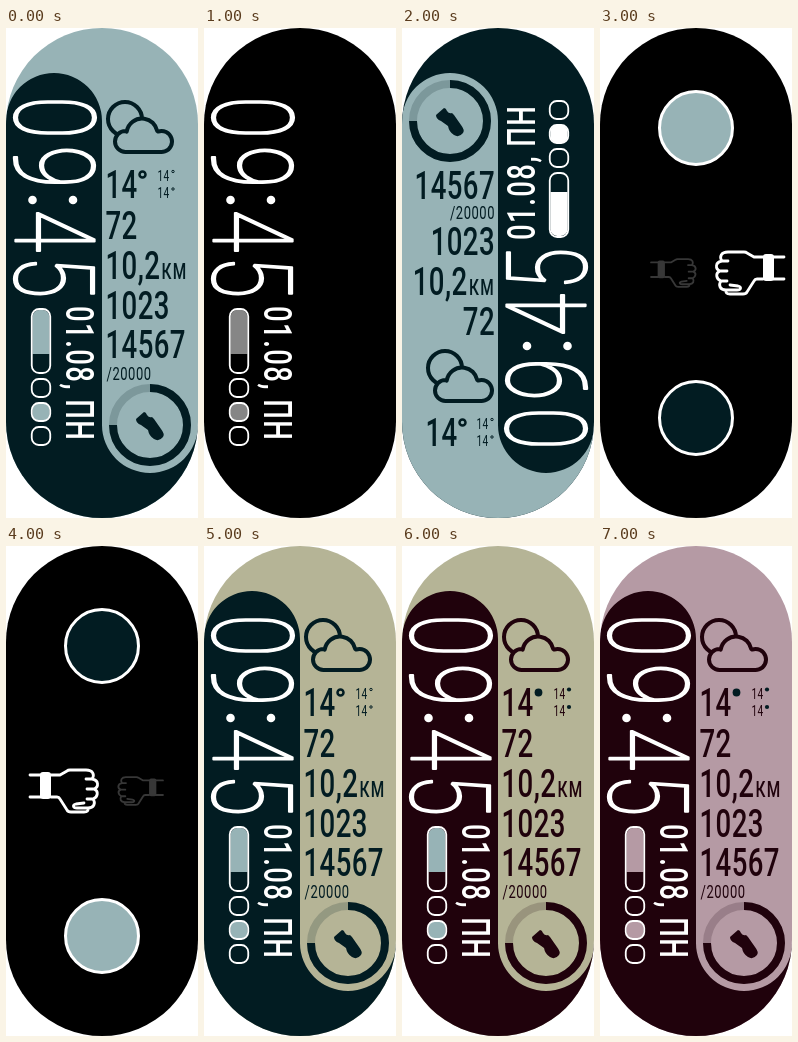
An HTML page with a canvas for the animation above (8000 ms loop, 192x490 px).

```html
<!DOCTYPE html>
<html lang="ru">
<head>
<meta charset="utf-8">
<title>Watch face</title>
<style>
html, body { margin: 0; width: 100%; height: 100%; overflow: hidden; background: #fff; }
canvas { display: block; width: 192px; height: 490px; }
</style>
</head>
<body>
<canvas id="stage"></canvas>
<script>
const W = 192, H = 490, STEP = 1000, TAU = Math.PI * 2;
const TEAL = '#97b3b6', INK = '#021c22', SAND = '#b5b496', ROSE = '#b59aa4', WINE = '#20020c';
const NARROW = 0.7; // condensed look shared by all type

const canvas = document.getElementById('stage');
const ctx = canvas.getContext('2d');
const dpr = window.devicePixelRatio || 1;
canvas.width = W * dpr;
canvas.height = H * dpr;

function group(draw, x = 0, y = 0, angle = 0, sx = 1, sy = sx) {
  ctx.save();
  ctx.translate(x, y);
  ctx.rotate(angle);
  ctx.scale(sx, sy);
  draw();
  ctx.restore();
}

function text(str, x, y, size, { color, align = 'left', weight = 500, spacing = 0.6, bold = 0 }) {
  group(() => {
    ctx.font = `${weight} ${size}px Roboto, sans-serif`;
    ctx.letterSpacing = spacing + 'px';
    ctx.textAlign = align;
    ctx.lineJoin = 'round';
    ctx.fillStyle = ctx.strokeStyle = color;
    ctx.fillText(str, 0, 0);
    if (bold) {
      ctx.lineWidth = bold;
      ctx.strokeText(str, 0, 0);
    }
  }, x, y, 0, NARROW, 1);
}

function paint(fill, stroke, width) {
  if (fill) { ctx.fillStyle = fill; ctx.fill(); }
  if (stroke) { ctx.strokeStyle = stroke; ctx.lineWidth = width; ctx.stroke(); }
}

function disc(x, y, r, fill, stroke, width) {
  ctx.beginPath();
  ctx.arc(x, y, r, 0, TAU);
  paint(fill, stroke, width);
}

function pill(x, y, w, h, r, fill, stroke, width) {
  ctx.beginPath();
  ctx.roundRect(x, y, w, h, r);
  paint(fill, stroke, width);
}

// Two interlocking halves: one owns top and right, the other left and bottom
function halves(upper, lower) {
  ctx.fillStyle = upper;
  ctx.fillRect(0, 0, W, H);
  ctx.beginPath();
  ctx.moveTo(0, 93);
  ctx.arc(48, 93, 48, Math.PI, TAU);
  ctx.lineTo(96, 397);
  ctx.arc(144, 397, 48, Math.PI, 0, true);
  ctx.lineTo(W, H);
  ctx.lineTo(0, H);
  ctx.closePath();
  paint(lower);
}

function clock(fill) {
  const white = '#fff';
  group(() => {
    const big = { color: white, align: 'center', weight: 100, spacing: 0, bold: 2.3 };
    [['0', 89.5], ['9', 138.7], ['4', 203], ['5', 249]].forEach(([c, x]) => text(c, x, -0.5, 111, big));
    disc(172, -18.5, 4.3, white);
    disc(172, -59, 4.3, white);
    text('01.08, ПН', 278, -51.5, 39.4, { color: white, spacing: 2 });
  }, 8, 0, Math.PI / 2);

  ctx.save();
  ctx.beginPath();
  ctx.rect(20, 280, 30, 46);
  ctx.clip();
  pill(26.5, 282, 17, 62, 7, fill);
  ctx.restore();
  pill(25.75, 281, 18.5, 64, 7.5, null, white, 1.8);
  pill(26.5, 375.5, 17, 17, 6, fill);
  [360, 384, 408].forEach(y => pill(25.75, y - 9, 18.5, 18, 7, null, white, 1.8));
}

function weather(x, y, ink, bg) {
  group(() => {
    ctx.lineJoin = 'round';
    disc(19, 19, 17, null, ink, 4);
    ctx.beginPath();
    ctx.arc(19.5, 41.5, 10.5, Math.PI / 2, 1.5 * Math.PI + 0.1);
    ctx.arc(36, 34, 15.5, Math.PI + 0.15, -0.2);
    ctx.arc(55.5, 41.5, 10.5, -1.9, Math.PI / 2);
    ctx.closePath();
    paint(bg, ink, 4);
  }, x, y);
}

function steps(x, y, ink) {
  const ring = (from, to) => {
    ctx.beginPath();
    ctx.arc(0, 0, 37, from, to);
    paint(null, ink, 8);
  };
  group(() => {
    ctx.globalAlpha = 0.18;
    ring(0, TAU);
    ctx.globalAlpha = 1;
    ring(-Math.PI / 2, Math.PI);
    ctx.fillStyle = ink;
    ctx.fill(new Path2D('M-14 -6 L-6 -13 Q-4 -13 -3 -10 Q-1 -7 2 -8 L4 -6 L11 4 Q15 9 13 12 Q9 17 4 14 Q-1 11 -2 5 L-9 0 Q-14 -2 -14 -6Z'));
  }, x, y);
}

function degree(x, y, r, color, solid) {
  if (solid) disc(x, y, r + 0.9, color);
  else disc(x, y, r, null, color, r > 2 ? 2.5 : 1);
}

function temperature(x, y, gap, ink, mark, solid) {
  const small = { color: ink, weight: 400 };
  text('14', x, y, 39.4, { color: ink });
  degree(x + 37, y - 23.5, 3, mark, solid);
  [17.5, 0].forEach(up => {
    text('14', x + gap, y - up, 14.5, small);
    degree(x + gap + 15.5, y - up - 9, 1.2, mark, solid);
  });
}

function stats(x, ys, align, ink) {
  const style = { color: ink, align };
  const right = align === 'right';
  const [pulse, km, kcal, count, goal] = ys;
  text('72', x, pulse, 39.4, style);
  text('10,2', right ? x - 27.5 : x, km, 39.4, style);
  text('КМ', right ? x : x + 56, km, 22, { color: ink, align, spacing: 1.8 });
  text('1023', x, kcal, 39.4, style);
  text('14567', x, count, 39.4, style);
  text('/20000', x + (right ? 0 : 1), goal, 18.5, { color: ink, align, weight: 400, spacing: 0.8 });
}

function leftFace({ light, dark, fill = light, mark = dark, solid = false }) {
  halves(light, dark);
  clock(fill);
  weather(100, 72, dark, light);
  temperature(99.5, 170, 52, dark, mark, solid);
  stats(99.5, [211, 251, 291, 330, 352], 'left', dark);
  steps(144, 397, dark);
}

function rightFace() {
  halves(INK, TEAL);
  group(() => clock('#fff'), W, H, Math.PI);
  steps(48, 93, INK);
  stats(93, [307, 267, 227, 171, 191], 'right', INK);
  weather(24, 321, INK, TEAL);
  temperature(23.5, 418, 51, INK, INK, false);
}

function dimFace() {
  ctx.fillStyle = '#000';
  ctx.fillRect(0, 0, W, H);
  clock('#868686');
}

const FIST = new Path2D(
  'M-34 -16H-23M-34 6H-23M-13 -16H-4L3 -20Q4 -21 6 -21H22C29 -21 31 -16 28 -12' +
  'C35 -11 35 -4 30 -2C35 0 34 6 29 8C32 12 30 17 24 17H13C9 17 8 14 12 13L20 12' +
  'M28 -12H22M30 -2H23M29 8H23M-13 6H-7Q-5 6 -4 8L3 19Q4 21 7 21H20Q25 21 24 17');

function fist(x, scale, flip, color) {
  group(() => {
    ctx.lineWidth = 2.8;
    ctx.lineJoin = ctx.lineCap = 'round';
    ctx.strokeStyle = color;
    ctx.stroke(FIST);
    pill(-24, -19, 11, 27, 3, color);
  }, x, 245, 0, flip * scale, scale);
}

function picker(top, bottom, leftHand) {
  ctx.fillStyle = '#000';
  ctx.fillRect(0, 0, W, H);
  disc(96, 100, 36.5, top, '#fff', 3);
  disc(96, 390, 36.5, bottom, '#fff', 3);
  const grey = '#373737';
  if (leftHand) {
    fist(58, 1, 1, '#fff');
    fist(134.5, 0.66, -1, grey);
  } else {
    fist(73.5, 0.66, 1, grey);
    fist(150, 1, -1, '#fff');
  }
}

const scenes = [
  () => leftFace({ light: TEAL, dark: INK }),
  dimFace,
  rightFace,
  () => picker(TEAL, INK, false),
  () => picker(INK, TEAL, true),
  () => leftFace({ light: SAND, dark: INK, fill: TEAL }),
  () => leftFace({ light: SAND, dark: WINE, fill: TEAL, mark: INK, solid: true }),
  () => leftFace({ light: ROSE, dark: WINE, mark: INK, solid: true })
];

let start;
function frame(now) {
  start ??= now;
  const scene = scenes[Math.floor((now - start) / STEP) % scenes.length];
  ctx.setTransform(dpr, 0, 0, dpr, 0, 0);
  ctx.clearRect(0, 0, W, H);
  ctx.save();
  ctx.beginPath();
  ctx.roundRect(0, 0, W, H, 96);
  ctx.clip();
  scene();
  ctx.restore();
  requestAnimationFrame(frame);
}
requestAnimationFrame(frame);
</script>
</body>
</html>
```
